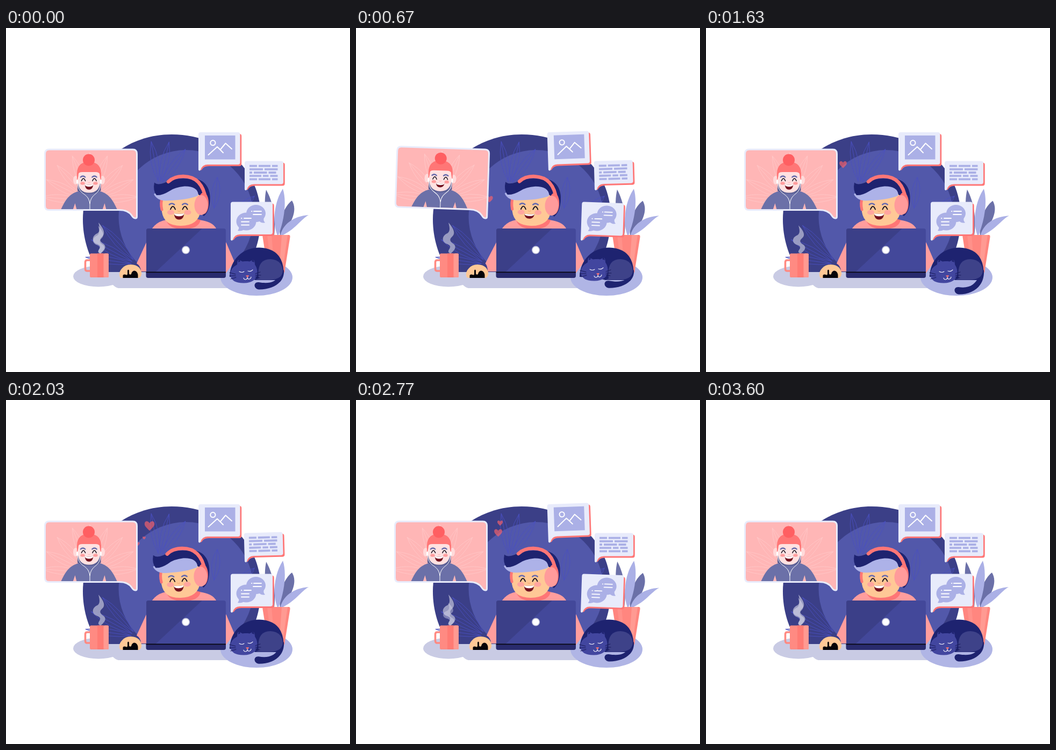
An HTML page that plays this animation: 640 px wide and 640 px high, repeating every 3730 ms.

```html
<!DOCTYPE html>
<html lang="en">
<head>
<meta charset="utf-8">
<title>Video call</title>
<style>
html, body { margin: 0; width: 100%; height: 100%; overflow: hidden; background: #fff; }
svg { display: block; width: 100vw; height: 100vh; }
.line { fill: none; stroke-linecap: round; stroke-linejoin: round; }
</style>
</head>
<body>
<svg id="stage" viewBox="0 0 640 640" xmlns="http://www.w3.org/2000/svg"></svg>
<script>
const LOOP = 3730;
const LILAC = '#abb0e6', PALE = '#e8ebfb', CORAL = '#ff7676', ROSE = '#ff9d9d';
const SKIN = '#ffc896', SLATE = '#6b70a8', NAVY = '#1e2370', INK = '#15121f';

const path = (d, fill, more = '') => `<path d="${d}" fill="${fill}" ${more}/>`;
const line = (d, color, w = 1, more = '') => `<path class="line" d="${d}" stroke="${color}" stroke-width="${w}" ${more}/>`;
const oval = (x, y, rx, ry, fill) => `<ellipse cx="${x}" cy="${y}" rx="${rx}" ry="${ry}" fill="${fill}"/>`;
const box = (x, y, w, h, fill, r = 0) => `<rect x="${x}" y="${y}" width="${w}" height="${h}" rx="${r}" fill="${fill}"/>`;
const group = (id, body) => `<g id="${id}">${body}</g>`;
const arc = (x, y, w, h) => `M${x - w} ${y}Q${x} ${y - h} ${x + w} ${y}`;
// The same mark twice, dx apart
const pair = (draw, x, dx) => draw(x) + draw(x + dx);

// Outlined leaves spread around a point, angles in degrees
function fan(x, y, from, to, n, near, far, w) {
  let d = '';
  for (let i = 0; i < n; i++) {
    const a = (from + (to - from) * i / (n - 1)) * Math.PI / 180;
    const at = (r, s) => `${(x + Math.cos(a) * r - Math.sin(a) * s).toFixed(1)} ${(y + Math.sin(a) * r + Math.cos(a) * s).toFixed(1)}`;
    const mid = (near + far) / 2;
    d += `M${at(near, 0)}Q${at(mid, w)} ${at(far, 0)}Q${at(mid, -w)} ${at(near, 0)}L${at(far, 0)}`;
  }
  return d;
}

function bubble(id, x, y, w, h, body) {
  const shape = (tail) => `M${x + 4} ${y}H${x + w - 4}q4 0 4 4V${y + h - 4}q0 4-4 4H${x + 17}q-10 0-13 ${tail - 1}q-2 3-4 0V${y + 4}q0-4 4-4Z`;
  return group(id, path(shape(7), CORAL, 'transform="translate(2.7 3)"') + path(shape(11), PALE) + body);
}

function backdrop() {
  const wall = fan(285, 295, -100, -55, 3, 10, 85, 14) + fan(382, 385, -84, -42, 2, 50, 108, 15) +
    fan(245, 440, -172, -132, 3, 12, 98, 13);
  return oval(172, 462, 47, 19.5, '#c9cbe4') +
    path('M175 454H430V484H209Q204 483 199 478L180 466Z', '#c9cbe4') +
    '<clipPath id="floor"><rect width="640" height="454"/></clipPath><g clip-path="url(#floor)">' +
    path('M143 356C143 268 215 198 308 198C403 198 474 264 474 352C474 450 400 526 308 526S143 450 143 356Z', '#3b3f87') +
    oval(335, 351, 125.5, 124, '#5258aa') + line(wall, '#4a50c0', .9) + '</g>' +
    oval(466, 464, 67, 34, '#b0b5e5');
}

function caller() {
  const frame = 'M80 226H236Q243.5 226 243.5 234V351Q243.5 354 240.5 354Q237 354 234 349Q227 338.5 211 338.5H80Q72.5 338.5 72.5 331V234Q72.5 226 80 226Z';
  const head = pair(x => oval(x, 283, 4.5, 8, '#ffdada'), 129.5, 50) +
    path('M133.5 268V285Q135 306.500 154.500 306.500Q174 306.500 175.500 285V268Z', '#ffe1e1') +
    path('M132 284V270Q133 249 154 249Q176 249 177 270V284Q175 281 174 271Q172 268 167 268H142Q136 268 135 271Q134 281 132 284Z', CORAL) +
    oval(154, 245.5, 11, 11, '#ff5f62') +
    line(pair(x => arc(x, 277.5, 4.3, 4), 143, 21.5), '#6267aa', 2.2) +
    line(pair(x => arc(x, 284.5, 3.6, 9), 144, 20.5), INK, 1.5) +
    pair(x => oval(x, 289, 4.2, 2.8, ROSE), 142.5, 24) +
    line('M152.5 287q2 2 4 0', '#ffb5b5') + group('mouthA', '');
  return '<clipPath id="screen"><rect x="73" y="227" width="170" height="110"/></clipPath>' +
    group('video', path(frame, '#ffb6b6') + '<g clip-path="url(#screen)">' +
      line(fan(156, 322, -175, -5, 9, 18, 90, 14), '#ffcaca', .8) +
      path('M102 338C109 323 116 309 134 304H176C193 309 200 323 207 338Z', SLATE) +
      pair(x => path(`M${x} 338l4-12l3 12Z`, '#ffb6b6'), 124.500, 55) +
      path('M133 288H176.500V303Q155 314 133 303Z', '#5a5f94') + group('headA', head) +
      line('M133 287C134 313 153 304 156 327V338M176 287C176 313 159 304 156 327', '#fff') +
      pair(x => oval(x, 286, 1.5, 4, '#fff'), 132.5, 44) + '</g>' +
      line(frame, PALE, 3));
}

function worker() {
  const head =
    path('M340 281C368 276 382 298 379.500 322Q378 342 368 350L350 330Z', NAVY) +
    path('M290 312V342Q294 368 325 368Q358 368 362 340V304Z', SKIN) +
    line('M290 338Q287 326 291 314', CORAL, 5) +
    path('M275 309Q282 323 302 321Q338 320 357 312Q361 300 352 291L300 293Z', '#adb2e8') +
    path('M276 287.500Q282 293 295 288Q318 277 343 281Q368 286 374 318L358 310Q356 294 332 294.500Q314 296 303 304Q290 312 280 311Q273 303 276 287.500Z', NAVY) +
    line('M302 286C316 272 345 273 358 287Q369 299 371 318', CORAL, 6.5) +
    oval(367.5, 326, 9.5, 20, CORAL) + oval(363, 329.5, 12.5, 18.5, '#ff9b9b') +
    line(pair(x => arc(x, 328.5, 4.7, 4), 308.5, 24.5), '#666bb0', 2.6) +
    line(pair(x => arc(x, 337.500, 4.5, 11), 310.5, 22.5), INK, 1.9) +
    pair(x => oval(x, 343, 6.5, 4.5, '#ffa59f'), 306.5, 31.5) +
    line('M319.5 340q2.5 2.5 5 0', '#f5ae78', 1.2) + group('mouthB', '');
  return path('M262 400C264 388 268 376 276 368Q285 359 298 357H360Q384 360 391 373L410 400L425 435L409 456H262Z', ROSE) +
    path('M298 357Q329 349 362 357Q359 374 330 374Q302 374 298 357Z', CORAL) +
    group('headB', head) +
    `<path id="sleeve" fill="${ROSE}"/>` +
    group('hand',
      path('M211 460Q210 453 216 447Q222 440 232 440Q242 440 248 446Q253 453 252 459Q250 466 244 465H216Q211 465 211 460Z', SKIN) +
      path('M217.5 465V460Q220 457.5 224 459.5Q226 460 226 457V451Q227.5 448 229 451V457Q230 460 233 458Q234 452 239 451.5Q244 452 245.5 459V465Z', '#050408')) +
    box(261, 373, 148, 84, '#43489a', 4) +
    path('M265 373H365L276 456H261V377Q261 373 265 373Z', '#3b3f88') +
    oval(334.5, 413, 7.5, 7.5, '#c5c7db') + oval(334.5, 413, 6, 6, '#fff') +
    path('M260.5 455H409V461Q409 465 405 465H264.5Q260.5 465 260.5 461Z', '#292b6d') +
    box(260.5, 453.5, 148.5, 1.7, '#07060f');
}

function mug() {
  const steam = 'M176 420C164 414 184 408 170 402C158 398 160 386 170 382C176 378 174 370 172 362C181 372 186 382 179 388C172 394 176 398 182 402C189 409 180 416 176 420Z';
  return path(steam, '#aeb0cf', 'id="steamA" fill-opacity=".82"') +
    path(steam, '#dfe0ee', 'id="steamB" fill-opacity=".5"') +
    line('M158 432H151Q147.5 432 147.5 436V448Q147.5 452 151 452H158', '#ff8a82', 3.6) +
    box(156, 419.5, 35, 44.5, '#ff8a82', 2) + box(170, 419.5, 11, 44.5, '#ff7b74') +
    box(182, 419.5, 9, 44.5, '#ff9a92', 2);
}

function plant() {
  return group('leaves',
    path('M499 386C484 365 478 330 484 301C495 320 503 350 499 386Z', SLATE) +
    path('M510 388C507 365 514 335 532 321C541 335 537 358 510 388Z', SLATE) +
    path('M506 388C495 365 498 325 515 299C522 320 519 355 506 388Z', LILAC) +
    path('M510 388C514 365 535 350 563 348C548 356 540 374 510 388Z', LILAC)) +
    path('M479 385H527Q529 386 528.5 389L518 455H488L477.5 389Q477 385 479 385Z', '#ff867f') +
    path('M486 385H494L500 455H494Z', '#ff918a') +
    path('M513 385H524L514 455H508Z', '#ff9a92');
}

function messages() {
  const skips = [0, 55.5, 75.5, 17, 0];
  const text = skips.map((skip, r) => `<path d="M453 ${256.6 + r * 6.2}h52.5" stroke="${LILAC}" stroke-width="3.8"
    stroke-dasharray="14 3 22 3 10.5 3 25 3 24.5 3" stroke-dashoffset="${skip}"/>`).join('');
  return bubble('photo', 358, 194, 77.5, 60,
      box(370, 200, 56.5, 44.5, LILAC) +
      line('M376.5 236L393 221L404 232M398.5 226.5L408.5 214.5L420 225M389.5 213.7a4.6 4.6 0 1 1-9.2 0a4.6 4.6 0 1 1 9.2 0', '#fff', 2)) +
    bubble('note', 444, 247.5, 72, 43, text) +
    bubble('chat', 418, 323.5, 78, 60.5,
      oval(465, 345, 18, 16, LILAC) + path('M473 355Q481 357 480 350Q478 359 482 362Q475 364 470 358Z', LILAC) +
      oval(447, 360, 18.5, 16.5, LILAC) + path('M431 364Q436 372 431 377Q438 379 444 374Z', LILAC) +
      line('M457 341h.5M461 341H475M460 347H475M438 354h.5M443 354H456M438 360.5H452M438 366.5H452', '#fff', 1.8));
}

function cat() {
  return `<path id="tail" fill="${NAVY}"/>` +
    path('M416 463C417 430 441 408.500 471 408.500Q514 410 516.500 452Q515 469 503 469H464L442 463Z', NAVY) +
    path('M470 466Q466 430 492 430Q512 431 515 450Q515 468.500 490 468.500H464Z', '#3e4289') +
    group('catHead',
      path('M430 440Q430 432 433 431L440 434.5Q448 433 453 434.5L460 431Q463 433 463 440Q469 449 467 459Q464 474 443 474.5Q419 475 417 459Q417 447 430 440Z', '#42469f') +
      path('M436 434L433 430L432 436ZM457 434L460 430L462 436ZM441 434L445 431L449 434Z', NAVY) +
      line('M434 453q5 3 9 0M450 452q5 2 9-2M449 464Q449 468 445 468Q442 467 442 465M449 464Q450 468 453 467Q456 466 456 463', '#f2f1fb', 1.1) +
      path('M446 460.5L452 460Q451 463 449 464Z', CORAL) +
      line('M427 458L416 455M427 461L416 461M428 464L418 467M464 457L473 454M464 460L474 460M464 463L472 465', '#191b58'));
}

// Hearts drift out from behind the call window
const HEART = 'M0 5C-3 2-5 .5-5-2C-5-5-1.5-5.5 0-2.5C1.5-5.5 5-5 5-2C5 .5 3 2 0 5Z';
const HEART_LIFE = 1200;
const hearts = [
  { born: 150, x: 247, y: 320, dx: 3, dy: -4, size: 2 },
  { born: 1130, x: 240, y: 279, dx: 36, dy: -60, size: 2.2 },
  { born: 1700, x: 252, y: 269, dx: 18, dy: -45, size: 1.1 },
  { born: 1850, x: 240, y: 273, dx: 32, dy: -34, size: 1.75 }
];

document.getElementById('stage').innerHTML = backdrop() +
  hearts.map((h, i) => path(HEART, '#ff6268', `id="heart${i}"`)).join('') +
  caller() + worker() + mug() + plant() + messages() + cat();

const $ = id => document.getElementById(id);
const set = (id, name, value) => $(id).setAttribute(name, value);
const spin = (id, a, x, y) => set(id, 'transform', `rotate(${a.toFixed(3)} ${x} ${y})`);
const clamp = v => Math.max(0, Math.min(1, v));
const ease = u => u < .5 ? 4 * u ** 3 : 1 - 4 * (1 - u) ** 3;

// The loop is seven beats with a short rest between them
const beat = (t, i) => clamp((t - 30 - 540 * i) / (i < 6 ? 500 : 330));
const step = (t, i) => ease(beat(t, i));
// Goes 0 to 1 in one beat and back over the listed beats
const swing = (t, up, ...down) => step(t, up) - down.reduce((sum, i) => sum + step(t, i), 0) / down.length;
const openness = (t, beats) => beats.reduce((v, i) => v - ease(1 - Math.abs(2 * beat(t, i) - 1)), 1);

function mouth(id, x, y, w, open) {
  const h = 2 + open * w * 1.02, teeth = 1 + open * w * .45, top = y + (1 - open) * w * .34;
  const cup = (d, inset) => `M${-w} 0Q0 1.5 ${w} 0C${w - inset} ${d * .8} ${w * .45} ${d} 0 ${d}C${-w * .45} ${d} ${inset - w} ${d * .8} ${-w} 0Z`;
  $(id).innerHTML = `<g transform="translate(${x} ${top})">` + path(cup(h, .6), '#741320') +
    path(cup(teeth, .2), '#fff') + '</g>';
}

function drawSteam(t) {
  // The old wisp fades, then a new one rises and gains a lighter veil
  const grow = clamp((t - 1080) / 1220);
  const rise = t < 1080 ? 1 : 1 - (1 - grow) ** 4;
  const fade = t < 1080 ? 1 - clamp((t - 720) / 330) : clamp(grow * 10);
  const veil = 1 - clamp((t - 400) / 220) + clamp((t - 2200) / 700);
  const wide = .85 + .15 * rise;
  set('steamA', 'transform', `translate(${174 * (1 - wide)} ${420 * (1 - rise)}) scale(${wide} ${rise})`);
  set('steamA', 'opacity', fade);
  set('steamB', 'transform', `translate(15 ${420 - 376 * veil}) scale(.91 ${.895 * veil})`);
  set('steamB', 'opacity', veil);
}

function drawHeart(h, i, t) {
  const k = clamp((t - h.born) / HEART_LIFE);
  set('heart' + i, 'transform', `translate(${h.x + h.dx * k} ${h.y + h.dy * k}) scale(${h.size * (.35 + .65 * k)})`);
  set('heart' + i, 'opacity', .65 * clamp(k * 12) * clamp((1 - k) * 10));
}

function draw(t) {
  const early = swing(t, 0, 1), nod = swing(t, 3, 4), late = swing(t, 4, 5, 6);
  spin('video', 2 * early, 240, 355);
  spin('photo', -2 * (early + late), 360, 265);
  spin('chat', 2 * (early + late), 420, 394);
  spin('note', -1.6 * (early + nod), 446, 299);
  spin('headA', 2 * swing(t, 5, 6), 154, 305);
  spin('headB', 1.5 * early - 1.6 * nod, 326, 370);
  spin('leaves', 1.2 * swing(t, 0, 3) + 1.4 * late, 507, 390);
  mouth('mouthA', 154.5, 290.7, 7.8, openness(t, [0, 1, 2]));
  mouth('mouthB', 322, 345, 9.3, openness(t, [0, 1]));

  const lift = step(t, 0) ** 2 - step(t, 2) ** 2, slide = -6 * lift;
  set('hand', 'transform', `translate(${slide} 0)`);
  set('sleeve', 'd', `M262 397L${243 + slide * .4} 438Q${251 + slide} 443 ${251 + slide} 453H262Z`);
  set('catHead', 'transform', `translate(${lift} ${-4 * lift})`);

  const sway = 4 * swing(t, 1, 4) + 5 * swing(t, 2, 3) - 3 * early, y = 480 + sway;
  set('tail', 'd', `M517 450C519 ${474 + sway * .7} 496 ${y + 7} 470 ${y + 6.5}C460 ${y + 5} 460 ${y - 8} 470 ${y - 7}C488 ${y - 4} 502 ${474 + sway * .5} 508 460Z`);

  drawSteam(t);
  hearts.forEach((h, i) => drawHeart(h, i, t));
}

const start = performance.now();
function tick() {
  draw((performance.now() - start) % LOOP);
  requestAnimationFrame(tick);
}
draw(0);
requestAnimationFrame(tick);
</script>
</body>
</html>
```
